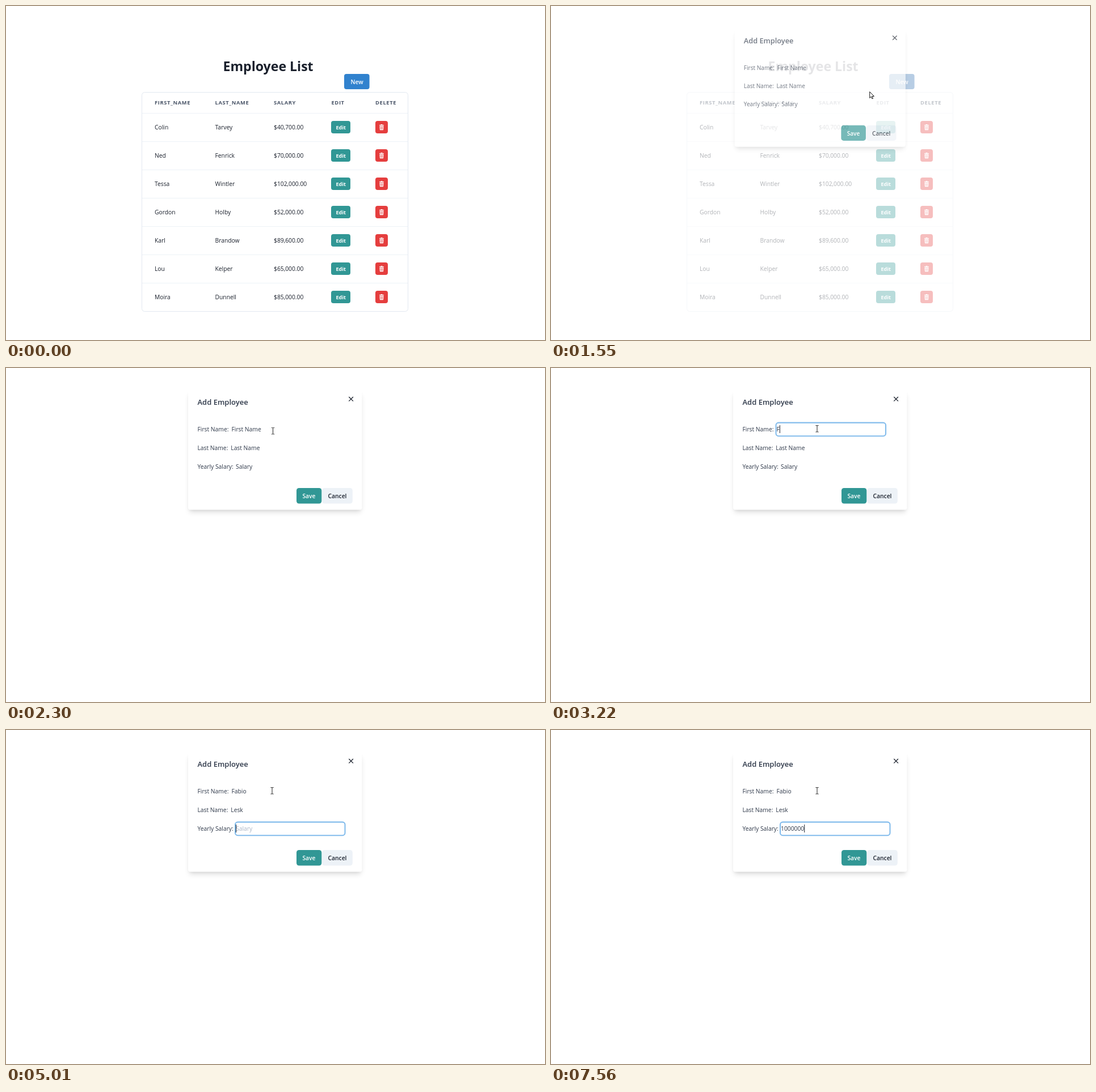
Write an HTML page that moves like this. It is 950 px wide and 590 px high and loops after 8000 ms.

```html
<!DOCTYPE html>
<html lang="en">
<head>
<meta charset="utf-8">
<title>Employee List</title>
<style>
html, body { margin: 0; width: 100%; height: 100%; overflow: hidden; background: #fff; }
svg { display: block; width: 950px; height: 590px; }
text { font: 10.3px "Open Sans", "Noto Sans", sans-serif; fill: #2d3748; white-space: pre; }
.title { font-size: 23.1px; font-weight: 700; fill: #1a202c; }
.heading { font-size: 13px; font-weight: 600; }
.th { font-size: 9.4px; font-weight: 700; letter-spacing: .6px; fill: #4a5568; }
.btn { font-size: 10.3px; font-weight: 600; text-anchor: middle; fill: #fff; }
.small { font-size: 9.1px; font-weight: 700; }
.dark { fill: #1a202c; }
.hint { fill: #a9b5c6; }
.shadow { filter: blur(5px); opacity: .12; }
.shadow.near { filter: blur(2px); opacity: .06; }
.pointer { fill: #fff; stroke: #111; stroke-width: 1; stroke-linejoin: round; }
</style>
</head>
<body>
<svg viewBox="0 0 950 590">
  <defs>
    <g id="trash">
      <path fill="#fff" d="M-4-4.4h2.2l.6-.9h2.4l.6.9H4v1.2H-4zM-3.5-2.6h7l-.4 6.7q-.1.9-1 .9h-4.2q-.9 0-1-.9z"/>
      <path stroke="#e53e3e" stroke-width=".7" d="M-1.6-1.3v5M0-1.3v5M1.6-1.3v5"/>
    </g>
  </defs>
  <g id="page"></g>
  <rect id="veil" width="950" height="590" fill="#fff"/>
  <g id="modal"></g>
  <g id="cursor">
    <path id="arrow" class="pointer" d="M.5.5v11l2.5-2.4 1.7 3.8 1.7-.8-1.7-3.6h3.5z"/>
    <path id="hand" class="pointer" d="M-1.5 1.3q0-1.3 1.2-1.3t1.2 1.3v4.2q1-.7 1.9.3 1-.5 1.7.5 1.5-.3 1.5 1.2v3.3q0 1.8-1.3 3.2v2h-5.7v-1.7l-3-4.5q-.8-1.5.5-1.900 1 0 2 1.600z"/>
    <path id="beam" fill="none" stroke="#222" d="M-2.5-5.5h1.7l.8.7.8-.7h1.7M0-5v10.5M-2.5 6h1.7l.8-.7.8.7h1.7"/>
  </g>
</svg>
<script>
const LOOP = 8000;
const $ = id => document.getElementById(id);
const text = (x, y, s, cls = '') => `<text x="${x}" y="${y}" class="${cls}">${s}</text>`;
const box = (x, y, w, h, fill, r = 4.5, more = '') =>
  `<rect x="${x}" y="${y}" width="${w}" height="${h}" rx="${r}" fill="${fill}" ${more}/>`;
const clamp = v => Math.min(1, Math.max(0, v));

const columns = [262, 368.5, 472, 573.5, 651];
const heads = ['FIRST_NAME', 'LAST_NAME', 'SALARY', 'EDIT', 'DELETE'];
const staff = [
  ['Colin', 'Tarvey', '$40,700.00'],
  ['Ned', 'Fenrick', '$70,000.00'],
  ['Tessa', 'Wintler', '$102,000.00'],
  ['Gordon', 'Holby', '$52,000.00'],
  ['Karl', 'Brandow', '$89,600.00'],
  ['Lou', 'Kelper', '$65,000.00'],
  ['Moira', 'Dunnell', '$85,000.00']
];

const row = (person, i) => {
  const y = 189 + i * 50;
  return `<path d="M240 ${y + .5}h468" stroke="#edf2f7"/>` +
    person.map((s, c) => text(columns[c], y + 29, s, 'dark')).join('') +
    box(573, y + 14, 34, 22, '#319795', 4) + text(590.3, y + 28.6, 'Edit', 'btn small') +
    box(651, y + 14, 22, 22, '#e53e3e', 4) + `<use href="#trash" x="662" y="${y + 25.3}"/>`;
};

$('page').innerHTML =
  text(382.5, 115, 'Employee List', 'title') +
  box(596, 120, 44.6, 27, '#3182ce', 4, 'id="new"') + text(618.5, 138, 'New', 'btn') +
  box(239.5, 152.5, 469, 387, 'none', 5, 'stroke="#e2e8f0"') +
  heads.map((s, c) => text(columns[c], 174, s, 'th')).join('') +
  staff.map(row).join('');

// Each field opens at start, closes at end and gains one letter at each key time
const fields = [
  { label: 'First Name:', hint: 'First Name', x: 397.5, y: 108, start: 2430, end: 4090,
    value: 'Fabio', keys: [3220, 3390, 3590, 3690, 3890] },
  { label: 'Last Name:', hint: 'Last Name', x: 396.3, y: 141, start: 4090, end: 4840,
    value: 'Lesk', keys: [4380, 4550, 4680, 4680] },
  { label: 'Yearly Salary:', hint: 'Salary', x: 405, y: 174, start: 4840, end: LOOP,
    value: '1000000', keys: [5560, 5920, 6200, 6460, 7100, 7360, 7560] }
];

$('modal').innerHTML =
  box(323, 48, 302.5, 207, '#000', 4, 'class="shadow"') +
  box(322.5, 43, 303.5, 209, '#000', 4, 'class="shadow near"') +
  box(321, 39, 306.5, 211.5, '#fff', 4) +
  text(337.5, 65, 'Add Employee', 'heading') +
  '<path d="M604.3 51l7.6 7.6m0-7.6l-7.6 7.6" stroke="#1a202c" stroke-width="1.3"/>' +
  fields.map((f, i) =>
    text(337.5, f.y + 4, f.label) +
    box(f.x - 1, f.y - 11.4, 193.5, 23.6, 'none', 4.5, `id="ring${i}" stroke="#83bcec" stroke-width="2.1"`) +
    `<text id="input${i}" x="${f.x}" y="${f.y + 4}"></text>` +
    box(0, f.y - 7, 1, 14, '#1a202c', 0, `id="caret${i}"`)
  ).join('') +
  box(512, 212, 44.3, 27.5, '#319795') + text(534, 230, 'Save', 'btn') +
  box(557, 212, 53.8, 27.5, '#edf2f7') + text(584, 230, 'Cancel', 'btn dark');

// Pointer path: time, x, y
const path = [
  [120, 917, 570], [300, 868, 505], [500, 752, 360], [680, 648, 238], [800, 600, 184],
  [860, 595, 166], [920, 614, 148.5], [960, 625, 143], [1060, 632, 138], [1370, 632, 138],
  [1480, 594, 148], [1610, 534, 153.5], [1800, 503, 152], [2160, 476, 125], [2340, 469, 107]
];

function pointerAt(t) {
  const i = path.findIndex(p => p[0] > t);
  if (i < 0) return path[path.length - 1].slice(1);
  const [t0, x0, y0] = path[Math.max(0, i - 1)], [t1, x1, y1] = path[i];
  const k = clamp((t - t0) / (t1 - t0));
  return [x0 + (x1 - x0) * k, y0 + (y1 - y0) * k];
}

const show = (id, on) => $(id).setAttribute('visibility', on ? 'visible' : 'hidden');

function drawField(f, i, t) {
  const count = f.keys.filter(k => k <= t).length;
  const active = t >= f.start && t < f.end;
  const input = $('input' + i);
  input.textContent = count ? f.value.slice(0, count) : f.hint;
  input.setAttribute('class', active && !count ? 'hint' : '');
  $('ring' + i).setAttribute('opacity', active ? clamp((t - f.start) / 150) : 0);
  const since = t - (count ? f.keys[count - 1] : f.start + 20);
  $('caret' + i).setAttribute('x', f.x + (count ? input.getComputedTextLength() : 0));
  $('caret' + i).setAttribute('opacity', +(active && since >= 0 && since % 1000 < 500));
}

function draw(t) {
  const hover = clamp((t - 940) / 120);
  const mix = (a, b) => Math.round(a + (b - a) * hover);
  $('new').setAttribute('fill', `rgb(${mix(49, 43)},${mix(130, 108)},${mix(206, 176)})`);

  const open = 1 - (1 - clamp((t - 1490) / 200)) ** 3;
  const scale = .95 + .05 * open;
  $('veil').setAttribute('opacity', open);
  $('modal').setAttribute('opacity', open);
  $('modal').setAttribute('transform', `translate(474.25 144.75) scale(${scale}) translate(-474.25 -144.75)`);
  fields.forEach((f, i) => drawField(f, i, t));

  const [x, y] = pointerAt(t);
  const shape = t < 120 ? '' : t > 940 && t < 1460 ? 'hand' : t > 2160 && y < 119 ? 'beam' : 'arrow';
  $('cursor').setAttribute('transform', `translate(${x} ${y})`);
  for (const id of ['arrow', 'hand', 'beam']) show(id, id === shape);
}

const begin = performance.now();
function tick() {
  draw((performance.now() - begin) % LOOP);
  requestAnimationFrame(tick);
}
tick();
</script>
</body>
</html>
```
